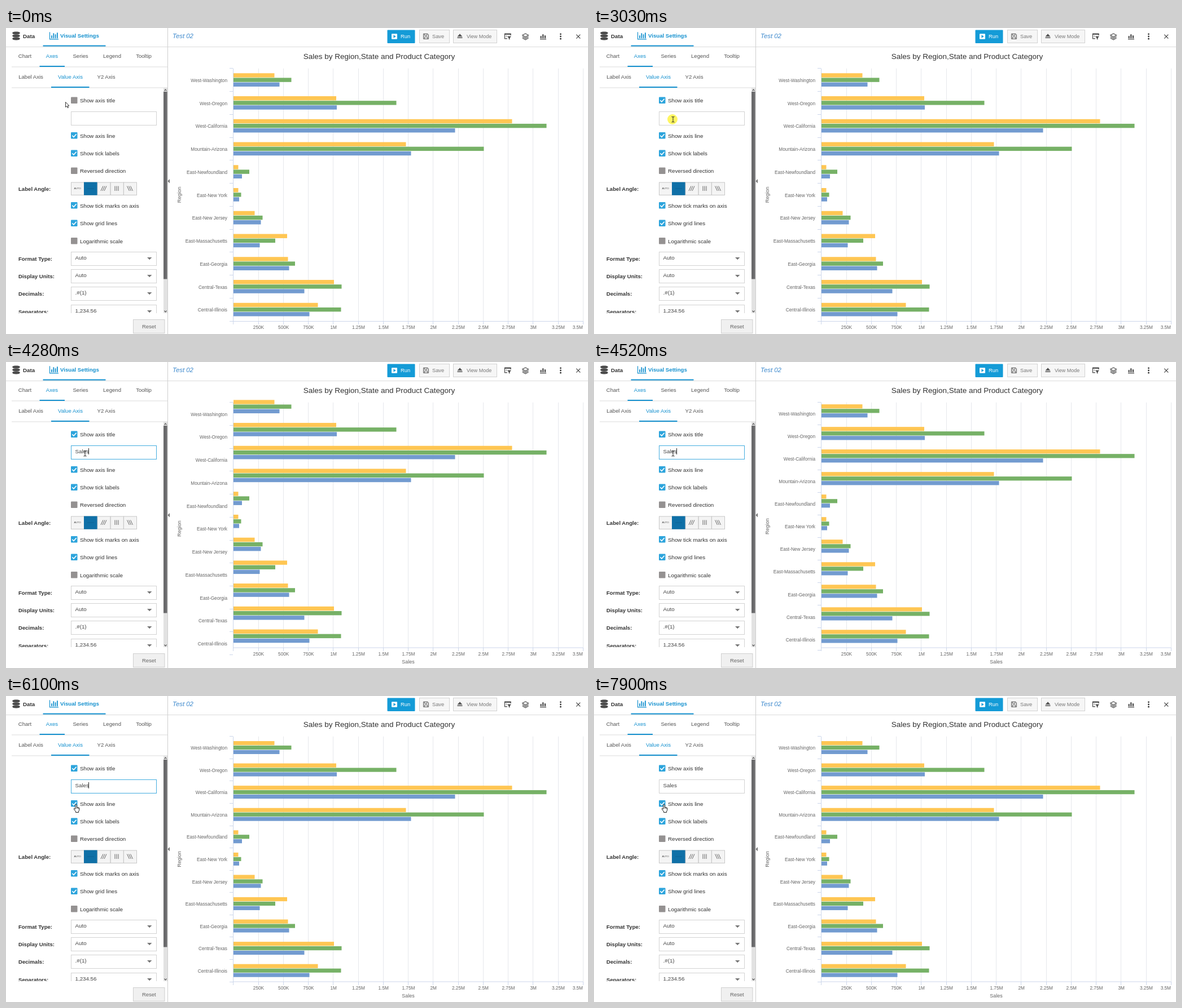
These frames come from a looping animation (1031 by 543 pixels, 8000 ms). An HTML page:

```html
<!DOCTYPE html>
<html lang="en">
<head>
<meta charset="utf-8">
<title>Chart axis settings</title>
<style>
html, body { margin: 0; width: 100%; height: 100%; overflow: hidden; background: #fff; }
svg { display: block; width: 1031px; height: 543px; font-family: "Liberation Sans", Arial, sans-serif; }
</style>
</head>
<body>
<svg viewBox="0 0 1031 543">
  <g id="page"></g>
  <g id="live"></g>
</svg>
<script>
const BLUE = '#1591cf', LINE = '#ccd6eb', EDGE = '#d2d2d2';
const LOOP = 8000, STEP = 80;

const rect = (x, y, w, h, fill, more = '') =>
  `<rect x="${x}" y="${y}" width="${w}" height="${h}" fill="${fill}" ${more}/>`;
const box = (x, y, w, h, fill = '#fff', stroke = EDGE) =>
  rect(x + .5, y + .5, w - 1, h - 1, fill, `stroke="${stroke}"`);
const path = (d, stroke, width = 1, fill = 'none') =>
  `<path d="${d}" stroke="${stroke}" stroke-width="${width}" fill="${fill}"/>`;
const text = (x, mid, s, size = 9.75, fill = '#333', more = '') =>
  `<text x="${x}" y="${mid + size * .31}" font-size="${size}" fill="${fill}" ${more}>${s}</text>`;
const CENTER = 'text-anchor="middle"', END = 'text-anchor="end"', BOLD = 'font-weight="bold"';
const at = (x, y, s) => `<g transform="translate(${x} ${y})">${s}</g>`;
const lerp = (a, b, p) => a + (b - a) * p;

function checkbox(y, on) {
  return rect(115, y - 6.4, 11.5, 11.5, on ? '#2ca4dc' : '#949191', 'rx="1"') +
    (on ? path(`M117.3 ${y - .7}l2.6 2.7 4.7-5.2`, '#fff', 1.6) : '');
}

function icons() {
  let s = '';
  // database and chart
  for (const y of [9, 14, 19])
    s += path(`M11.5 ${y}c0-2.4 13 -2.4 13 0v1.3c0 2.6-13 2.6-13 0z`, 'none', 0, '#4a4a4a');
  s += path('M77.5 8v12.5h15.5', BLUE, 1.2) + path('M81 19v-5M84.3 19v-9M87.6 19v-7M90.9 19v-10', BLUE, 1.8);
  // run, save, view mode
  s += rect(683, 11, 10, 9.5, '#fff', 'rx="1"') + path('M686.5 13l4.2 2.7-4.2 2.7z', 'none', 0, '#149bd7');
  s += path('M739.5 11h7.5l1.5 1.5v7.5h-9zM741.5 11v3h4.5v-3M741.5 20v-3.5h5v3.5', '#555');
  s += path('M799.5 16l4.5-5 4.5 5zM799.5 17.3h9v1.4h-9z', 'none', 0, '#555');
  // filter, layers, bars, menu, close
  s += path('M888 19.5h-4.5v-8.5h10.5v3', '#444', 1.2) + path('M883 11.5h11.5', '#444', 2);
  s += path('M888 15.5h7l-2.6 3v3l-1.8-1v-2z', 'none', 0, '#444') + path('M885.5 15h2', '#444');
  s += path('M914.8 13.5l5.4-3 5.4 3-5.4 3z', '#444', 1.1) + path('M914.8 16l5.4 3 5.4-3M914.8 18.5l5.4 3 5.4-3', '#444', 1.1);
  s += path('M946 20.5h11', '#444', 1.2) + path('M947.7 19v-4M951.3 19v-7M955 19v-5', '#444', 2.2);
  for (const y of [11.5, 15.7, 19.9]) s += `<circle cx="982.5" cy="${y}" r="1.4" fill="#333"/>`;
  return s + path('M1010.3 12.3l7 7M1017.3 12.3l-7 7', '#444', 1.2);
}

function topBar() {
  let s = text(30, 14.5, 'Data', 9.75, '#333', BOLD) + text(96, 14, 'Visual Settings', 9.65, BLUE, BOLD);
  s += text(295, 14, 'Test 02', 11.4, '#3a87cc', 'font-style="italic"');
  s += rect(0, 33, 1031, 1, '#dcdcdc') + rect(65.5, 30.6, 111, 2, BLUE);
  s += rect(675.5, 3.5, 49, 23.5, '#149bd7', 'rx="1"') + text(699, 15.5, 'Run', 9.3, '#fff');
  s += box(732, 3, 54, 24, '#f6f6f6') + text(755, 15.5, 'Save', 9.3, '#777');
  s += box(792, 3, 78, 24, '#f6f6f6') + text(816, 15.5, 'View Mode', 9, '#777');
  return s + at(0, -.7, icons());
}

function sidePanel() {
  let s = '';
  const tabs = (y, names) => names.map(([x, name, on]) =>
    text(x, y, name, 9.6, on ? BLUE : '#555', CENTER)).join('');
  s += tabs(50.5, [[33.5, 'Chart'], [81.5, 'Axes', 1], [132, 'Series'], [188, 'Legend'], [244, 'Tooltip']]);
  s += rect(10, 68.5, 276, 1, '#dcdcdc') + rect(59.5, 67, 44.5, 2, BLUE);
  s += tabs(87.5, [[44, 'Label Axis'], [114, 'Value Axis', 1], [177.5, 'Y2 Axis']]);
  s += rect(10, 105.5, 276, 1, '#dcdcdc') + rect(80, 104, 67.5, 2, BLUE);

  const rows = [[129, 'Show axis title'], [191.5, 'Show axis line'], [223, 'Show tick labels', 1],
    [254, 'Reversed direction', 0], [315.5, 'Show tick marks on axis', 1],
    [347, 'Show grid lines', 1], [378.5, 'Logarithmic scale', 0]];
  for (const [y, label, on] of rows)
    s += text(131, y, label) + (on === undefined ? '' : checkbox(y, on));

  s += text(22, 286, 'Label Angle:', 9.6, '#333', BOLD);
  for (let i = 0; i < 5; i++) s += box(115 + i * 23.25, 273.5, 24, 23.5, '#f4f4f4', '#c8c8c8');
  s += rect(138, 273.5, 23.5, 23.2, '#0f70a7') + path('M144 285h12', '#0d6394');
  s += text(126.5, 285, 'AUTO', 4.4, '#444', CENTER);
  [[173, 2], [196, 0], [219.5, -2]].forEach(([x, lean]) => {
    for (const d of [-3, 0, 3]) s += path(`M${x + d + lean} 280.5L${x + d - lean} 289`, '#555', .9);
  });

  // drop-downs, the last one cut by the panel's lower edge
  [['Format Type:', 'Auto'], ['Display Units:', 'Auto'], ['Decimals:', '.#(1)'], ['Separators:', '1,234.56']]
    .forEach(([label, value], i) => {
      const y = 397 + Math.round(i * 31.2);
      s += text(22, y + 13, label, 9.6, '#333', BOLD) + box(115, y, 152, 25);
      s += text(122.5, y + 11, value, 9.75, '#444') + path(`M250 ${y + 10}h8.4l-4.2 4.2z`, 'none', 0, '#777');
    });
  s += rect(0, 506, 286, 37, '#fff') + box(225, 517, 56.5, 25, '#f0f0f0', '#cfcfcf');
  s += text(253.3, 529.8, 'Reset', 9.5, '#666', CENTER);

  s += rect(279, 106, 7, 400, '#e2e2e2') + rect(279, 113, 6.5, 332.5, '#6a6a6c');
  s += path('M280.5 111.5l2-2.3 2 2.3M280.5 501.7l2 2.3 2-2.3', '#444', 1.1);
  return s + rect(286, 0, 1, 543, '#cfcfcf') + path('M290 268v7.5l-3.6-3.7z', 'none', 0, '#777');
}

document.getElementById('page').innerHTML = topBar() + sidePanel() +
  text(661, 50.7, 'Sales by Region,State and Product Category', 13.5, '#333', CENTER);

// Category name and right end of its three bars
const REGIONS = [
  ['West-Washington', 475.5, 505.5, 484.5], ['West-Oregon', 585, 691.5, 586],
  ['West-California', 896.5, 957.5, 795.5], ['Mountain-Arizona', 708.5, 846.5, 717.5],
  ['East-Newfoundland', 411.5, 431, 418], ['East-New York', 411.5, 416.5, 413],
  ['East-New Jersey', 440.5, 454.5, 451.5], ['East-Massachusetts', 498, 477, 449.5],
  ['East-Georgia', 499.5, 512, 501.5], ['Central-Texas', 581, 594.5, 528.5],
  ['Central-Illinois', 552.5, 593.5, 537.5]];
const COLORS = ['#ffc653', '#76b166', '#729bd0'];
const TOP = 71.75, LOW = 520, HIGH = 507;

function chart(t) {
  const titled = t >= 4280, bottom = titled ? HIGH : LOW;
  const held = 4280 + Math.floor((t - 4280) / STEP) * STEP;
  const u = titled ? Math.min(1, (held - 4230) / 500) : 0;
  const p = (1 - Math.cos(Math.PI * u)) / 2;
  const was = (LOW - TOP) / 11, will = (HIGH - TOP) / 11, pitch = lerp(was, will, p);
  let s = '';
  for (let k = 0; k <= 14; k++) {
    const x = 402.9 + k * 44.25, lineX = Math.floor(x) + .5;
    if (k) {
      s += path(`M${lineX} ${TOP}V${bottom}`, '#e6e8ec');
      const label = k < 4 ? k * 250 + 'K' : k / 4 + 'M';
      s += text(k < 14 ? x + .3 : 1022, bottom + 11.2, label, 8.25, '#666', k < 14 ? CENTER : END);
    }
    s += path(`M${lineX} ${bottom}v6`, LINE);
  }
  const gap = .37, lift = titled ? 13.25 * (1 - p) : 0, h = pitch * .2;
  REGIONS.forEach(([name, ...ends], i) => {
    const mid = TOP + (i + .5) * pitch;
    s += text(392, mid + 1.1, name, 8.25, '#666', END);
    ends.forEach((end, j) => {
      const y = mid - lift + (j - 1.5) * h;
      s += rect(403, y + gap, end - 403, h - 2 * gap, COLORS[j]);
    });
  });
  for (let i = 0; i <= 11; i++) s += path(`M396 ${Math.floor(TOP + i * pitch) + .5}h6`, LINE);
  s += path(`M402.5 ${TOP}V${bottom}`, LINE);
  if (t < 6880 || t >= 7900) s += path(`M402 ${bottom + (titled ? 0 : .5)}H1022`, LINE);
  const mid = lerp((TOP + LOW) / 2, (TOP + HIGH) / 2, p);
  s += `<g transform="translate(307.4 ${mid}) rotate(-90)">${text(0, 0, 'Region', 9, '#666', CENTER)}</g>`;
  return s + (titled ? text(712.5, 532, 'Sales', 9, '#666', CENTER) : '');
}

const within = (t, spans) => spans.some(([a, b]) => t >= a && t < b);

function form(t) {
  const focus = within(t, [[3110, 6650]]);
  const caret = within(t, [[3110, 3580], [3970, 4600], [5040, 5620], [6100, 6650]]);
  const typed = t >= 3970;
  let s = checkbox(129, t >= 1700) + checkbox(191.5, !within(t, [[6800, 7820]]));
  s += box(115, 148, 152, 25, '#fff', focus ? '#45addf' : EDGE);
  if (typed) s += text(122.5, 159, 'Sales', 9.75, '#444');
  if (caret) s += rect(typed ? 146 : 122, 153, 1, 11, '#222');
  return s;
}

const POINTERS = {
  arrow: path('M.5 .5v9l2.2-2 1.5 3.3 1.4-.6-1.4-3.2h2.7z', '#222', .9, '#fff'),
  hand: path('M-1.2 1.2Q0-.6 1.2 1.2V5.2l3.6.9q1.3.4 1.2 1.9l-.6 3.5-.9 1.5v1.5h-5v-1.5l-3-4q-.7-1.6.8-1.6l1.5 1.5z', '#222', 1, '#fff') +
    path('M1.2 5v3M3 5.8v2.4M4.6 6.3v2', '#222', .7),
  beam: path('M-1.5-4.5h1.5l1 .7 1-.7h1.5M1-4V4.5M-1.5 5h1.5l1-.7 1 .7h1.5', '#222', 1)
};
const MOVES = [[840, 4, 127, 128], [2400, 6, 139, 162], [5620, 7, 124, 192]];

function pointer(t) {
  let x = 105, y = 131;
  for (const [start, n, toX, toY] of MOVES) {
    const k = Math.min(n, Math.max(0, Math.floor((t - start) / STEP) + 1)) / n;
    const p = k * k * (3 - 2 * k);
    x = lerp(x, toX, p);
    y = lerp(y, toY, p);
  }
  const overBox = x >= 114 && (y < 136 || y > 185);
  const shape = overBox ? 'hand' : y > 148 && y < 173 ? 'beam' : 'arrow';
  const pressed = within(t, [[1470, 1780], [3030, 3270], [6570, 6880], [7660, 7900]]);
  const halo = pressed ? '<circle r="9" fill="#fff000" fill-opacity=".62"/>' : '';
  return at(x, y, halo + POINTERS[shape]);
}

const live = document.getElementById('live');
let shown = '';
function draw() {
  const t = performance.now() % LOOP;
  const next = chart(t) + form(t) + pointer(t);
  if (next !== shown) live.innerHTML = shown = next;
  requestAnimationFrame(draw);
}
draw();
</script>
</body>
</html>
```
